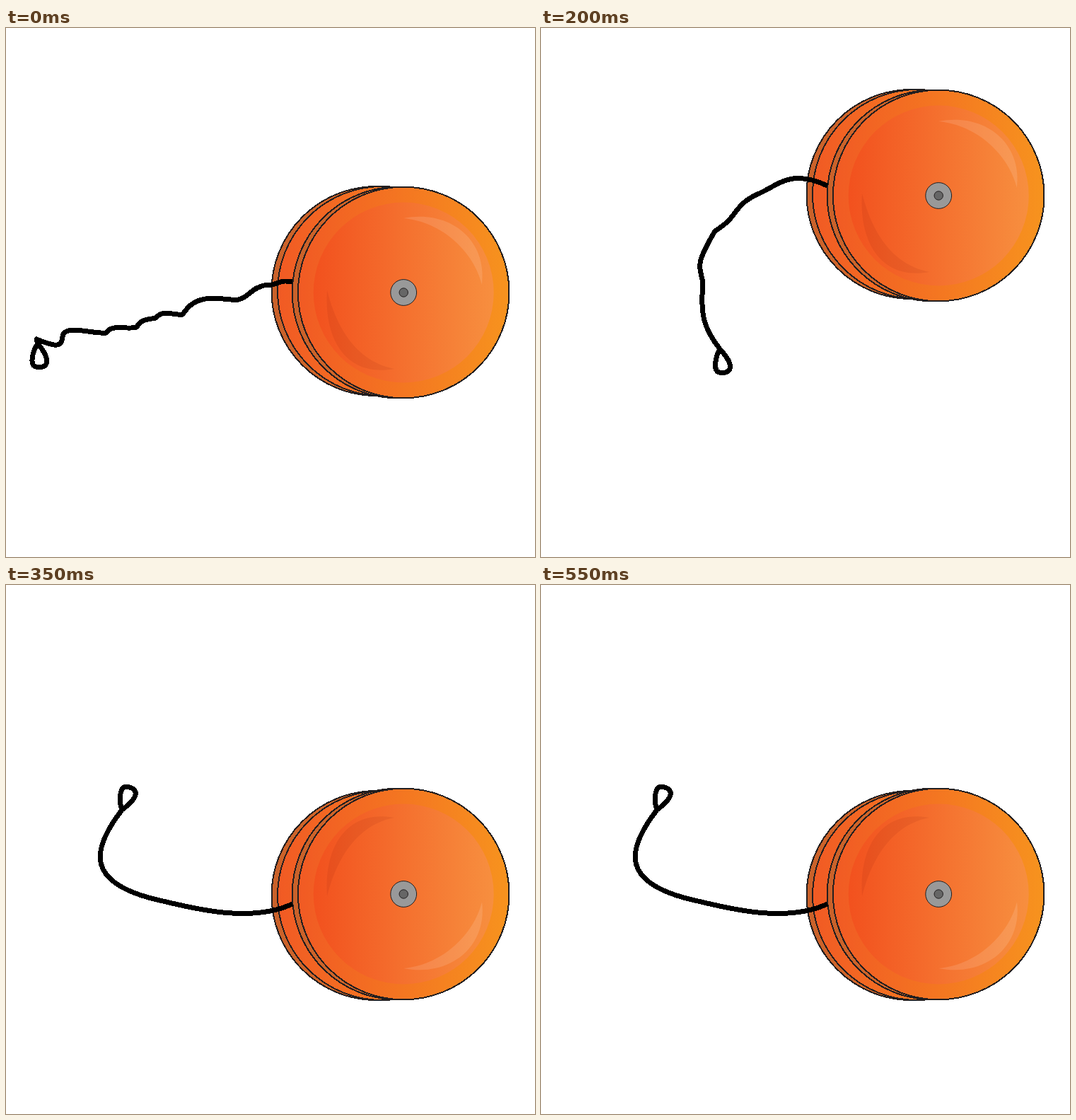
An HTML page that plays this animation: 748 by 748 pixels, repeating every 0.6 s.

```html
<!DOCTYPE html>
<html lang="en">
<head>
<meta charset="utf-8">
<title>Yo-yo</title>
<style>
html, body { margin: 0; height: 100%; overflow: hidden; background: #fff; }
svg { display: block; width: 100vw; height: 100vh; }
</style>
</head>
<body>
<svg viewBox="0 0 748 748">
  <defs>
    <linearGradient id="face">
      <stop offset="0" stop-color="#f15a24"/>
      <stop offset="1" stop-color="#f7931e"/>
    </linearGradient>
    <linearGradient id="dish">
      <stop offset="0" stop-color="#f2511e"/>
      <stop offset="1" stop-color="#f78f3f"/>
    </linearGradient>
    <linearGradient id="rim">
      <stop offset="0" stop-color="#c9612a"/>
      <stop offset=".5" stop-color="#dc6a26"/>
    </linearGradient>
  </defs>
  <g id="scene">
    <g id="yoyo">
      <g stroke="#231f20" stroke-width="2" shape-rendering="crispEdges">
        <circle cx="523.5" cy="372" r="148" fill="url(#rim)"/>
        <circle cx="532" cy="372" r="148" fill="url(#face)"/>
        <circle cx="554" cy="374" r="149.3" fill="url(#rim)"/>
        <circle cx="562.2" cy="374" r="149.3" fill="url(#face)"/>
      </g>
      <circle cx="562.2" cy="374" r="127.5" fill="url(#dish)"/>
      <path d="M562 269C628 256 681 300 673 363C662 318 618 274 562 269Z" fill="#fff" opacity=".12"/>
      <path d="M454 371C449 445 485 494 549 482C497 472 468 426 454 371Z" fill="#600" opacity=".08"/>
      <g stroke="#231f20">
        <circle cx="562.2" cy="374" r="18.4" fill="#999"/>
        <circle cx="562.2" cy="374" r="6.2" fill="#666"/>
      </g>
    </g>
    <g fill="none" stroke="#000" stroke-width="7" stroke-linejoin="round" shape-rendering="crispEdges">
      <path id="string"/>
      <path id="loop" d="M0 0C-6 10 -8 24 -5 30C-2 35 11 35 14 28C17 20 8 9 0 0Z"/>
    </g>
  </g>
</svg>
<script>
const STEP = 50;
const [scene, yoyo, string, loop] = ['scene', 'yoyo', 'string', 'loop'].map(id => document.getElementById(id));

// Poses from level to fully raised.
const poses = [
  { lift: 0, tilt: 4, curve: `M405 359C383 355 387 364 365 364C344 368 340 388 318 384
    C296 382 267 376 250 405C238 407 222 397 212 410C203 412 190 411 185 423
    C172 427 148 418 142 431C120 433 84 418 80 436C79 452 70 451 43 440L45 446` },
  { lift: 63, tilt: -11, curve: 'M405 297C340 267 250 295 205 305C120 328 116 368 164 430' },
  { lift: 137, tilt: 0, curve: `M405 223C351 198 334 224 306 235C270 252 280 267 246 287
    C218 335 224 335 229 360C225 405 230 425 253 454` },
  { lift: 197, tilt: 0, curve: 'M405 163C350 140 325 185 305 235C280 300 280 390 312 448' }
];

function draw() {
  const step = Math.floor(performance.now() / STEP) % 12;
  const phase = step % 6;
  const { lift, tilt, curve } = poses[Math.min(phase, 6 - phase)];
  // The second half of the cycle mirrors the first.
  scene.setAttribute('transform', step < 6 ? '' : 'translate(0 748) scale(1 -1)');
  yoyo.setAttribute('transform', `translate(0 ${-lift})`);
  string.setAttribute('d', curve);
  const end = string.getPointAtLength(string.getTotalLength());
  loop.setAttribute('transform', `translate(${end.x} ${end.y}) rotate(${tilt})`);
  requestAnimationFrame(draw);
}
draw();
</script>
</body>
</html>
```
